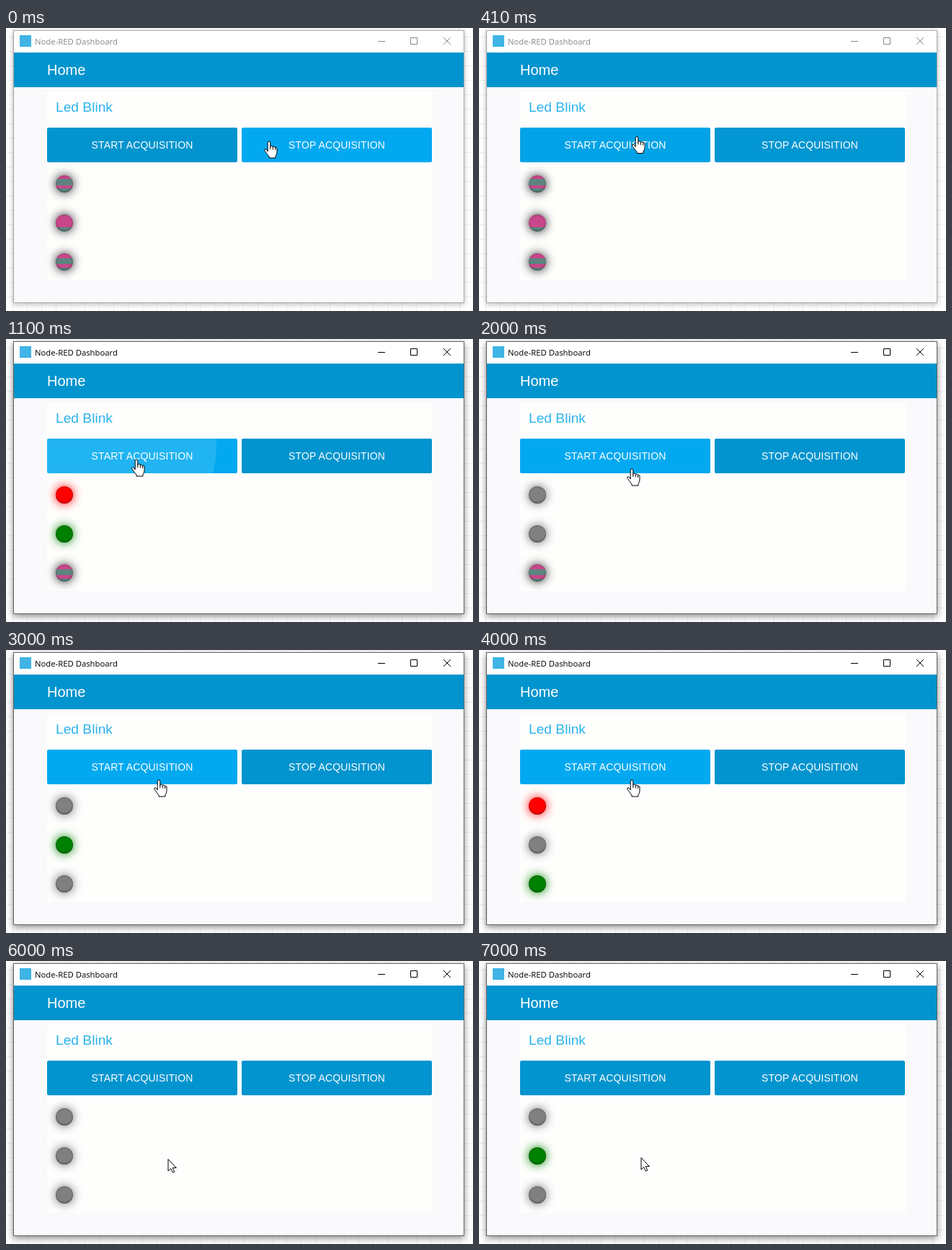
An HTML page for the animation above (8 s loop, 648 by 392 pixels).

```html
<!DOCTYPE html>
<html lang="en">
<head>
<meta charset="utf-8">
<title>Dashboard</title>
<style>
html, body { margin: 0; width: 100%; height: 100%; overflow: hidden; }
body {
  position: relative;
  background:
    repeating-linear-gradient(transparent 0 12px, #eee 12px 13px, transparent 13px 20px),
    repeating-linear-gradient(90deg, #fff 0 9px, #eee 9px 10px, #fff 10px 20px);
  font-family: "Liberation Sans", Arial, sans-serif;
}
div, svg { position: absolute; box-sizing: border-box; white-space: nowrap; }
#win {
  left: 10px; top: 3px; width: 626px; height: 378px;
  background: #fafafc; border: 1px solid #aaa;
  box-shadow: 0 2px 7px #0004; color: #888;
}
#win.active { border-color: #666; box-shadow: 0 3px 9px #0007; color: #000; }
#bar { left: 0; top: 0; width: 624px; height: 30px; background: #fff; }
#icon { left: 8px; top: 6px; width: 16px; height: 16px; background: #40b4e5; }
#title { left: 29px; top: 7px; font: 11.3px/16px "Open Sans", sans-serif; }
#controls { left: 0; top: 0; fill: none; stroke: currentColor; }
#head {
  left: 0; top: 30px; width: 624px; height: 48px; padding-left: 46px;
  background: #0294ce; color: #fff; font-size: 20px; line-height: 48px;
}
#card { left: 57px; top: 88px; width: 535px; height: 261px; background: #fefefd; }
#group { left: 69px; top: 98px; font-size: 19.2px; line-height: 23px; color: #2bb3ee; }
.btn {
  top: 138px; width: 264px; height: 48px; border-radius: 2px; overflow: hidden;
  color: #fff; font-size: 14px; font-weight: 500; line-height: 48px;
  letter-spacing: .01em; text-align: center;
}
#ripple { inset: 0; background: #fff; }
.led { left: 69px; width: 24px; height: 24px; border-radius: 50%; }
#cursor { left: 0; top: 0; overflow: visible; }
</style>
</head>
<body>
<div id="win">
  <div id="bar"></div>
  <div id="icon"></div>
  <div id="title">Node-RED Dashboard</div>
  <svg id="controls" width="624" height="30">
    <path d="M505 14.5h10M550.5 9.5h9v9h-9zM596 9l10 10M606 9l-10 10"/>
  </svg>
  <div id="head">Home</div>
</div>
<div id="card"></div>
<div id="group">Led Blink</div>
<div class="btn" id="start" style="left:57px">START ACQUISITION<div id="ripple"></div></div>
<div class="btn" id="stop" style="left:327px">STOP ACQUISITION</div>
<div class="led" style="top:204px"></div>
<div class="led" style="top:258px"></div>
<div class="led" style="top:312px"></div>
<svg id="cursor" width="1" height="1">
  <g id="pointer" fill="#fff" stroke="#000" stroke-linejoin="round">
    <path id="hand" d="M-1.8 14V1.8Q-1.8 0 0 0T1.8 1.8V7.5Q2 6 3.6 6.2T5.4 8Q5.6 6.9 7 7.1T8.6 9Q9 8 10 8.3T11 10V15Q11 18 9 20.5V23H0V21Q-2 19-3.5 16.5T-6.5 12.5Q-6.5 11-5 10.8T-1.8 14ZM1.8 7V11M5.4 8V11.5M8.6 9V12"/>
    <path id="arrow" d="M0 0V16.5L3.8 13 6.4 18.6 8.8 17.5 6.3 12H11.4Z"/>
  </g>
</svg>
<script>
const $ = id => document.getElementById(id);
const leds = document.querySelectorAll('.led');
const clamp = v => Math.max(0, Math.min(1, v));
const smooth = p => p * p * (3 - 2 * p);
const easeOut = p => 1 - (1 - p) ** 3;
const mix = (a, b, p) => a + (b - a) * p;

// time, x, y, easing towards this point
const path = [
  [0, 365, 157], [60, 365, 157], [600, 161, 148, smooth], [860, 161, 148],
  [1100, 181, 167], [1480, 212, 180, p => 1 - (1 - p) ** 1.5], [4620, 212, 180],
  [4900, 225, 274.5, smooth], [6580, 225, 274.5], [6680, 225, 272.5], [8000, 225, 272.5]
];

// each second's state: - idle, 0 off, R red, G green
const states = ['---', 'RG-', '00-', '0G0', 'R0G', 'RGG', '000', '0G0'];
const colors = { '-': '#555', 0: '#808080', R: '#f00', G: '#008000' };
const glows = { '-': '#222', 0: '#667', R: '#f00', G: '#008000' };
const pink = '#c8478a', teal = '#5d8480';
const bands = [[5, 14, 18], [1, 2, 18], [7, 15, 20]].map(([a, b, c], i) => {
  const [p, q] = i == 1 ? [teal, pink] : [pink, teal];
  return `linear-gradient(${p} ${a}px, ${q} ${a}px ${b}px, ${pink} ${b}px ${c}px, ${teal} ${c}px)`;
});

function cursorAt(t) {
  const i = path.findIndex(k => k[0] > t);
  const [t0, x0, y0] = path[i - 1], [t1, x1, y1, ease = p => p] = path[i];
  const p = ease((t - t0) / (t1 - t0));
  return [mix(x0, x1, p), mix(y0, y1, p)];
}

const fade = (t, from) => easeOut(clamp((t - from) / 400));
const shade = p => `rgb(2,${mix(148, 169, p)},${mix(206, 241, p)})`;

function draw(t) {
  $('win').className = t >= 860 ? 'active' : '';
  $('start').style.background = shade(fade(t, 280) - fade(t, 4656));
  $('stop').style.background = shade(1 - fade(t, 206));

  const radius = 170 * easeOut(clamp((t - 900) / 530));
  $('ripple').style.clipPath = `circle(${radius}px at 106px 12px)`;
  $('ripple').style.opacity = .12 * (1 - clamp((t - 1130) / 350));

  const state = states[Math.floor(t / 1000)];
  leds.forEach((led, i) => {
    const s = state[i];
    led.style.background = s == '-' ? bands[i] : colors[s];
    led.style.boxShadow = `0 0 14px ${glows[s]}, inset 0 -2px 2px #0004, inset 0 1px 2px #0003`;
  });

  const [x, y] = cursorAt(t), onButton = y < 187;
  $('pointer').setAttribute('transform', `translate(${x} ${y})`);
  $('hand').style.display = onButton ? '' : 'none';
  $('arrow').style.display = onButton ? 'none' : '';
}

let begin;
function tick(now) {
  begin ??= now;
  draw((now - begin) % 8000);
  requestAnimationFrame(tick);
}
draw(0);
requestAnimationFrame(tick);
</script>
</body>
</html>
```
